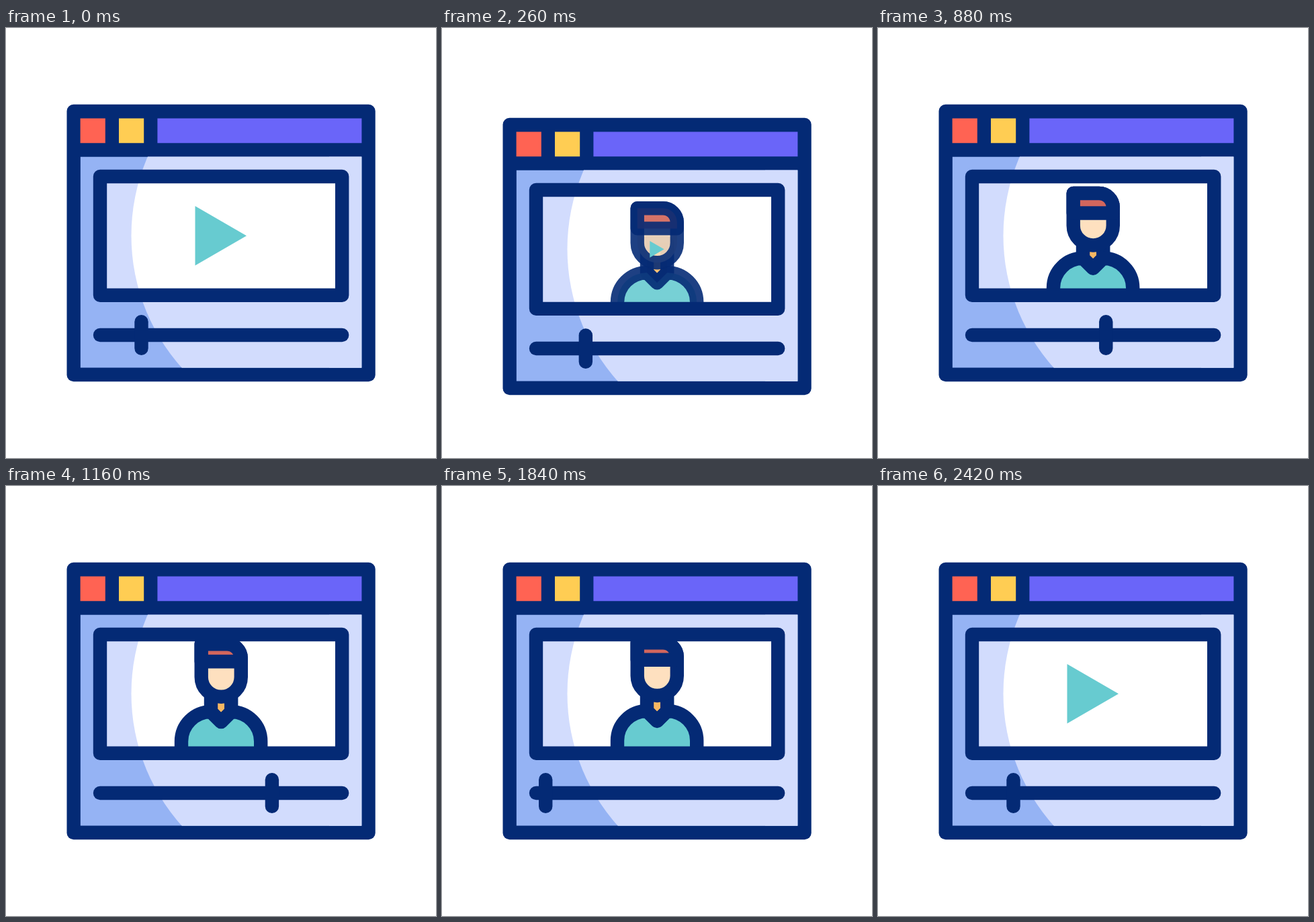
Animation, 640 px wide and 640 px high, one loop 2.82 s. Source, as an HTML page with a canvas:

```html
<!DOCTYPE html>
<html lang="en">
<head>
<meta charset="utf-8">
<title>Video player</title>
<style>
  html, body { margin: 0; width: 100%; height: 100%; overflow: hidden; background: #fff; }
  canvas { display: block; width: 640px; height: 640px; }
</style>
</head>
<body>
<canvas width="640" height="640"></canvas>
<script>
const LOOP = 2820;
const NAVY = '#042a75', TEAL = '#67cbd0', PALE = '#d2dcfd';
const ctx = document.querySelector('canvas').getContext('2d');

const smooth = p => p * p * (3 - 2 * p);

// Eased interpolation through [time, value] pairs.
function track(t, ...keys) {
  if (t <= keys[0][0]) return keys[0][1];
  for (let i = 1; i < keys.length; i++) {
    const [t0, a] = keys[i - 1], [t1, b] = keys[i];
    if (t < t1) return a + (b - a) * smooth((t - t0) / (t1 - t0));
  }
  return keys[keys.length - 1][1];
}

function box(x, y, right, bottom, color, radius = 0) {
  ctx.fillStyle = color;
  ctx.beginPath();
  ctx.roundRect(x, y, right - x, bottom - y, radius);
  ctx.fill();
}

function shape(d, fill, stroke = NAVY) {
  const path = new Path2D(d);
  if (fill) {
    ctx.fillStyle = fill;
    ctx.fill(path);
  }
  if (stroke) {
    ctx.strokeStyle = stroke;
    ctx.stroke(path);
  }
}

// A panel whose right part is covered by a large disc.
function panel(x, y, right, bottom, back, front) {
  ctx.save();
  ctx.beginPath();
  ctx.rect(x, y, right - x, bottom - y);
  ctx.clip();
  box(x, y, right, bottom, back);
  ctx.fillStyle = front;
  ctx.beginPath();
  ctx.arc(481.5, 309, 295, 0, 7);
  ctx.fill();
  ctx.fillRect(481, y, right - 481, bottom - y);
  ctx.restore();
}

function drawPerson(t) {
  const sway = rest => track(t, [200, rest], [720, 0], [1092, 1], [1466, 0], [1840, 1], [2213, rest]);
  const lift = sway(0.31);
  const top = 254.4 - 21 * lift;
  const band = 286.7 - 28 * lift;
  const jaw = 301.5 - 19 * sway(0.1);
  const collar = 363 - 13 * lift;
  const neck = collar - 15;

  ctx.save();
  ctx.beginPath();
  ctx.rect(150, 231, 340, 157);
  ctx.clip();
  ctx.globalAlpha = Math.max(0, Math.min(1, (t - 100) / 180, (2340 - t) / 160));

  shape(`M305 ${jaw}H335.2V${neck}L320.1 ${collar}L305 ${neck}Z`, '#f7b763');
  shape(`M261 420V${neck + 44}A44 44 0 0 1 305 ${neck}L320.1 ${collar}L335.2 ${neck}
    A44 44 0 0 1 379.2 ${neck + 44}V420Z`, TEAL);
  const crown = `M290.7 ${top}H328.8A21 21 0 0 1 349.8 ${top + 21}`;
  shape(`${crown}V${jaw}A29.5 29.5 0 0 1 290.7 ${jaw}Z`, '#fee0bf');
  shape(`${crown}V${band}H290.7Z`, '#d2665d');
  ctx.restore();
}

function drawPlay(t) {
  const size = track(t, [0, 1], [400, 0], [2100, 0], [2400, 1]);
  if (!size) return;
  ctx.save();
  ctx.translate(320, 309.3);
  ctx.scale(size, size);
  shape('M-38.5 -44.3L38 0L-38.5 44.3Z', TEAL, null);
  ctx.restore();
}

function knobX(t) {
  if (t < 1700) return 201.5 + Math.max(0, t - 200) * 0.2023;
  return track(t, [1700, 505], [1860, 140], [2100, 140], [2400, 201.5]);
}

function draw(t) {
  ctx.clearRect(0, 0, 640, 640);
  ctx.save();
  ctx.translate(0, track(t, [0, 0], [200, 26.5], [390, 0]));
  ctx.lineWidth = 20.4;
  ctx.lineCap = ctx.lineJoin = 'round';

  box(90.5, 113.7, 549.7, 526.2, NAVY, 10);
  box(110.6, 134.4, 147.8, 171.2, '#ff6353');
  box(168, 134.4, 205.2, 171.2, '#ffcd53');
  box(225.4, 134.4, 529.4, 171.2, '#6a65f9');
  panel(110.6, 191.5, 529.4, 505.8, '#95b3f4', PALE);
  panel(140, 221, 500, 398, PALE, '#fff');

  drawPerson(t);
  drawPlay(t);

  shape('M140 221H500.2V397.8H140Z');
  shape('M140 457H500.2');
  shape(`M${knobX(t)} 437.3V476.7`);
  ctx.restore();
}

function frame(now) {
  draw(now % LOOP);
  requestAnimationFrame(frame);
}
requestAnimationFrame(frame);
</script>
</body>
</html>
```
